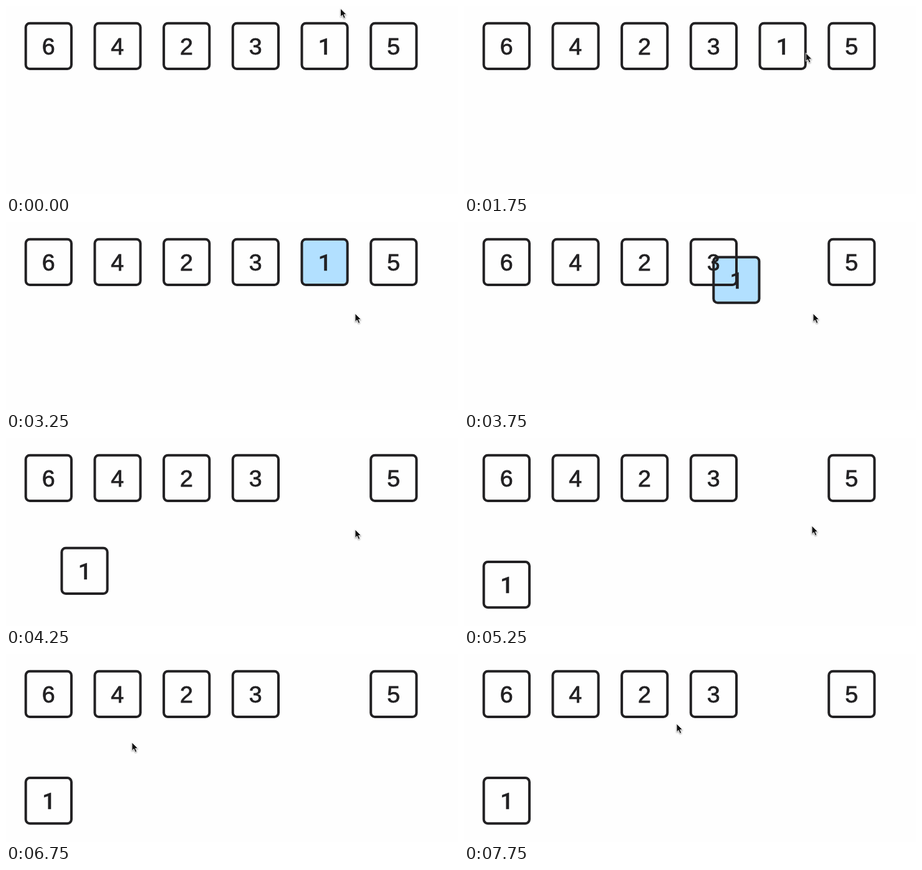
An HTML page that plays this animation: 725 by 302 pixels, repeating every 8000 ms.

```html
<!DOCTYPE html>
<html lang="en">
<head>
<meta charset="utf-8">
<title>Picking the smallest card</title>
<style>
  html, body { margin: 0; width: 100%; height: 100%; overflow: hidden; background: #fefefe; }
  svg { display: block; width: 725px; height: 302px; }
  rect { fill: none; stroke: #222123; stroke-width: 4; }
  text {
    font: 37.5px "Liberation Sans", Arial, sans-serif; text-anchor: middle;
    fill: #222123; stroke: #222123; stroke-width: .8;
  }
  .one { font-family: Roboto, sans-serif; font-weight: 500; stroke-width: .3; }
  #cursor { filter: drop-shadow(0 1.2px 1.2px rgba(0, 0, 0, .4)); }
</style>
</head>
<body>
<svg viewBox="0 0 725 302">
  <g id="cards"></g>
  <path id="cursor" d="M0 0V13.4L3.1 10.6L5.3 15.7L7.8 14.6L5.6 9.7H9.7Z"
        fill="#111" stroke="#fff" stroke-width=".9" stroke-linejoin="round"/>
</svg>
<script>
const LOOP = 8000, TICK = 250;
const LEFT = 29.7, TOP = 25.8, SLOT = 110.7, DROP = 171.3;
const MOVE_START = 3229, MOVE_TIME = 1500;
const NS = 'http://www.w3.org/2000/svg';
const cards = document.getElementById('cards');
const cursor = document.getElementById('cursor');

const HOME = { x: 536.5, y: 4 };
const moves = [
  { from: 1250, to: 2250, x: 560, y: 147 },
  { from: 5000, to: 5250, x: 558, y: 141 },
  { from: 5250, to: 5750, x: 740, y: -25 }, // off stage
  { from: 6250, to: 6750, x: 202, y: 142 },
  { from: 6750, to: 7500, x: 243, y: 114 },
  { from: 7500, to: 7750, x: 341, y: 112 }
];

const ramp = (t, from, to) => Math.min(1, Math.max(0, (t - from) / (to - from)));
const mix = (a, b, k) => a + (b - a) * k;
const cubicInOut = k => k < .5 ? 4 * k ** 3 : 1 - 4 * (1 - k) ** 3;

function add(parent, tag, attrs = {}) {
  const el = document.createElementNS(NS, tag);
  for (const key in attrs) el.setAttribute(key, attrs[key]);
  return parent.appendChild(el);
}

function place(el, x, y) {
  el.setAttribute('transform', `translate(${x.toFixed(2)} ${y.toFixed(2)})`);
}

function makeCard(label, slot) {
  const g = add(cards, 'g');
  add(g, 'rect', { x: 2, y: 2, width: 73.2, height: 73.2, rx: 6.5 });
  const isOne = label === '1';
  add(g, 'text', { x: isOne ? 39 : 38.4, y: 52, class: isOne ? 'one' : '' }).textContent = label;
  place(g, LEFT + slot * SLOT, TOP);
  return g;
}

const picked = [...'642315'].map(makeCard)[4];
cards.prepend(picked); // passes beneath the other outlines

function cursorAt(t) {
  return moves.reduce((p, m) => {
    const k = ramp(t, m.from, m.to);
    return { x: mix(p.x, m.x, k), y: mix(p.y, m.y, k) };
  }, HOME);
}

function draw(now) {
  const t = Math.floor(now % LOOP / TICK) * TICK;
  const k = cubicInOut(ramp(t, MOVE_START, MOVE_START + MOVE_TIME));
  place(picked, LEFT + 4 * SLOT * (1 - k), TOP + DROP * k);
  const tint = ramp(t, 2200, 2600) - ramp(t, 3800, 4200);
  picked.firstChild.style.fill = `rgba(178, 224, 255, ${tint})`;
  const tip = cursorAt(t);
  place(cursor, tip.x, tip.y);
}

let start;
function frame() {
  const now = performance.now();
  start ??= now;
  draw(now - start);
  requestAnimationFrame(frame);
}
draw(0);
requestAnimationFrame(frame);
</script>
</body>
</html>
```
